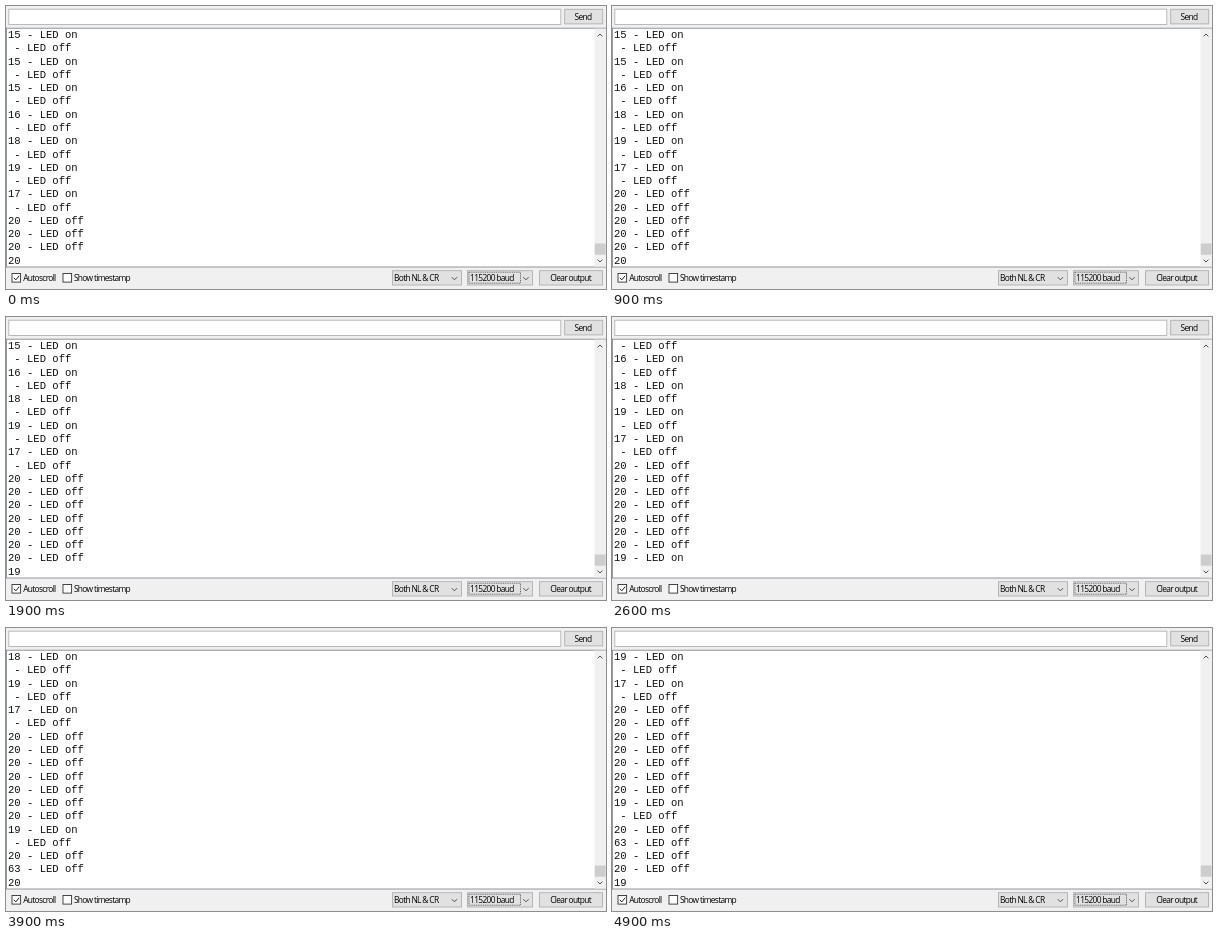
Recreate the animation shown at these times as an HTML page. Size 600x283 px, loop 5 s.

```html
<!DOCTYPE html>
<html lang="en">
<head>
<meta charset="utf-8">
<title>Serial monitor</title>
<style>
  html, body { margin: 0; width: 100%; height: 100%; overflow: hidden; background: #f0f0f0; }
  svg { display: block; width: 100vw; height: 100vh; }
  .log text { font: 10.55px "Liberation Mono", monospace; fill: #111; white-space: pre; }
  .ui { font: 8.4px "Open Sans", "Noto Sans", sans-serif; letter-spacing: -.66px; fill: #000; }
  .mid { text-anchor: middle; }
  .button { fill: #e1e1e1; stroke: #b0b0b0; stroke-width: .9; }
  .box { fill: #fff; stroke: #333; stroke-width: .9; }
  .line { fill: none; stroke: #505050; }
</style>
</head>
<body>
<svg viewBox="0 0 600 283" preserveAspectRatio="none">
  <rect width="600" height="283" fill="#f0f0f0"/>

  <rect x="2.8" y="3.2" width="552" height="15.3" fill="#fff" stroke="#b4b4b4" stroke-width=".9"/>
  <rect class="button" x="558.7" y="3.3" width="38" height="14.6"/>
  <text class="ui mid" x="577" y="13.5">Send</text>

  <rect x=".4" y="22.2" width="600" height="238.8" fill="#fff" stroke="#858a90" stroke-width=".9"/>
  <g id="log" class="log"></g>

  <rect x="588.5" y="22.7" width="11.5" height="237.8" fill="#f0f0f0"/>
  <rect x="588.8" y="237.5" width="10.8" height="11.2" fill="#cdcdcd"/>
  <path class="line" d="M591.6 30.4l2.4-2.4 2.4 2.4M591.6 253.6l2.4 2.4 2.4-2.4"/>

  <rect class="box" x="6" y="267.5" width="8.6" height="8.6"/>
  <path class="line" d="M7.8 271.8l2 2.1 3.4-4.2" style="stroke:#222"/>
  <text class="ui" x="17.2" y="275">Autoscroll</text>
  <rect class="box" x="57" y="267.5" width="8.6" height="8.6"/>
  <text class="ui" x="67.9" y="275">Show timestamp</text>

  <rect class="button" x="386.5" y="264.7" width="69" height="14.3"/>
  <text class="ui" x="388" y="275">Both NL &amp; CR</text>
  <path class="line" d="M445.8 271.2l2.6 2.6 2.6-2.6"/>

  <rect class="button" x="461.5" y="264.7" width="65" height="14.3"/>
  <rect x="462.9" y="266.2" width="51.6" height="11" fill="none" stroke="#444" stroke-width=".8" stroke-dasharray="1 .8"/>
  <text class="ui" x="464" y="275">115200 baud</text>
  <path class="line" d="M517.4 271.2l2.6 2.6 2.6-2.6"/>

  <rect class="button" x="533.5" y="264.7" width="63" height="14.3"/>
  <text class="ui mid" x="564.6" y="275">Clear output</text>
</svg>
<script>
  const LOOP = 5000, STEP = 500, FIRST = 300;
  const ROWS = 18, PITCH = 13.28;

  const off = n => n + " - LED off";
  const blink = n => [n + " - LED on", off("")];
  const lines = [
    ...[15, 15, 15, 16, 18, 19, 17].flatMap(blink),
    ...Array(7).fill(off(20)),
    ...blink(19),
    off(20), off(63), off(20), off(20), off(19)
  ];

  const log = document.getElementById("log");
  const rows = Array.from({ length: ROWS }, (_, i) => {
    const row = document.createElementNS("http://www.w3.org/2000/svg", "text");
    row.setAttribute("x", 2);
    row.setAttribute("y", 32 + i * PITCH);
    return log.appendChild(row);
  });

  let shown = -1;

  function draw(time) {
    const top = Math.floor((time % LOOP - FIRST) / STEP) + 1;
    if (top === shown) return;
    shown = top;
    rows.forEach((row, i) => {
      const line = lines[top + i];
      // The newest line holds only its reading until the state is printed.
      row.textContent = i < ROWS - 1 ? line : line.split(" - ")[0];
    });
  }

  const start = performance.now();
  function tick() {
    draw(performance.now() - start);
    requestAnimationFrame(tick);
  }
  draw(0);
  requestAnimationFrame(tick);
</script>
</body>
</html>
```
